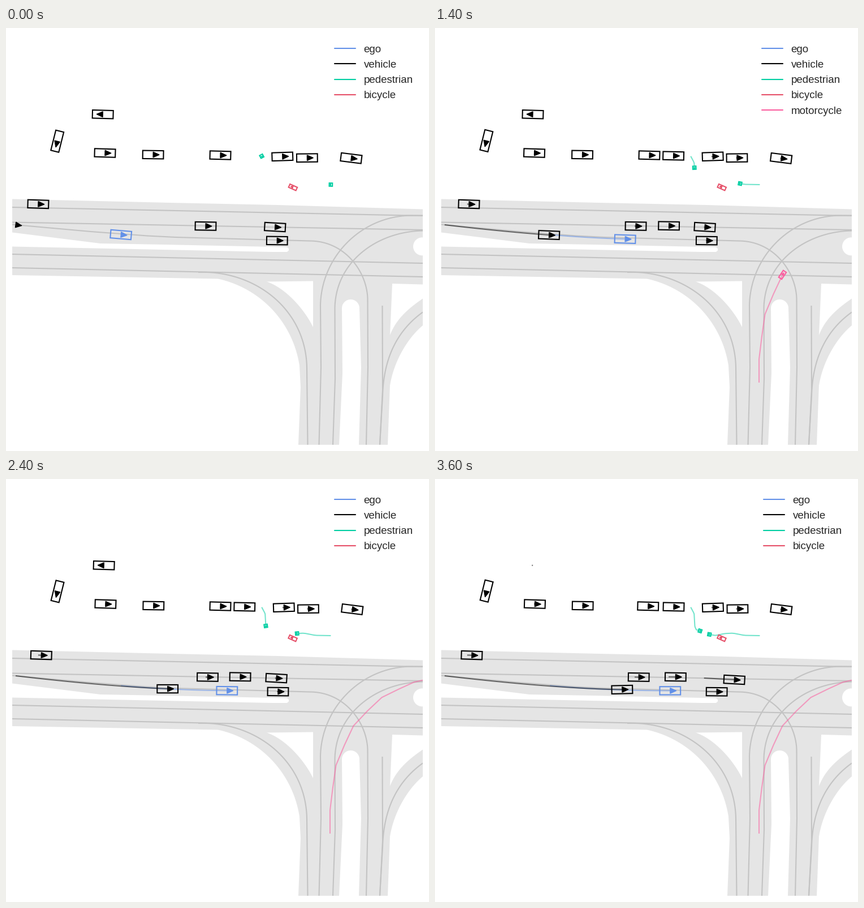
A matplotlib script that plays this animation: 748 by 748 pixels, repeating every 3.8 s.

```python
import numpy as np
import matplotlib.pyplot as plt
from matplotlib.animation import FuncAnimation
from matplotlib.patches import Circle, Polygon

SIZE, DPI = 748, 100
LEFT, RIGHT = 11, 737
STEPS, STEP_MS = 19, 200
STROKE = 1.5

ROAD, LANE, INK = "#e5e5e5", "#c3c3c3", "#262626"
CAR = (36.7, 14.4)
# kind: (colour, (length, width))
KINDS = {
    "ego": ("#6290e8", CAR),
    "vehicle": ("#000000", CAR),
    "pedestrian": ("#00cea2", (5.6, 5.6)),
    "bicycle": ("#e65069", (14.2, 6.2)),
    "motorcycle": ("#fb5d9f", (14.6, 6.4)),
}

plt.rcParams["font.family"] = "Liberation Sans"
fig = plt.figure(figsize=(SIZE / DPI, SIZE / DPI), dpi=DPI, facecolor="white")
side = (RIGHT - LEFT) / SIZE
ax = fig.add_axes([LEFT / SIZE, LEFT / SIZE, side, side])
ax.set_xlim(LEFT, RIGHT)
ax.set_ylim(RIGHT, LEFT)
ax.axis("off")


# ---- map ----

def bezier(a, b, c, d):
    t = np.linspace(0, 1, 60)[:, None]
    a, b, c, d = np.array([a, b, c, d], float)
    return (1 - t)**3 * a + 3 * t * (1 - t)**2 * b + 3 * t**2 * (1 - t) * c + t**3 * d


def area(points, color):
    ax.add_patch(Polygon(points, closed=True, fc=color, lw=0, zorder=1))


def lane(*points):
    ax.plot(*np.array(points).T, color=LANE, lw=STROKE, zorder=2,
            solid_capstyle="butt")


def draw_map():
    # Carriageways, side road and ramps
    inner = bezier((461, 448.5), (495, 460), (528, 498), (543, 529))
    outer = bezier((519, 597), (507, 520), (450, 460), (375, 443.5))
    area([(11, 302.5), (290, 309), (480, 313), (737, 320.5), (737, 453.5),
          (683, 452), (679, 543), (679, 630), (675, 737), (517, 737),
          (521, 635), *outer, (11, 437)], ROAD)
    area([*inner, (543, 447.5)], "white")
    upper = bezier((679, 543), (690, 515), (710, 497), (737, 478.5))
    lower = bezier((737, 526), (708, 550), (685, 593), (679, 632))
    area([*upper, *lower], ROAD)

    # Medians
    area([(11, 361.5), (167, 381), (280, 383), (497, 387.5), (500, 390),
          (500, 393.5), (497, 396), (470, 396), (11, 386.5)], "white")
    arc = np.linspace(np.pi, 2 * np.pi, 40)
    cap = np.column_stack([609.5 + 15.5 * np.cos(arc), 495.5 + 15.5 * np.sin(arc)])
    area([*cap, (628, 600), (624, 737), (589, 737), (595, 610)], "white")
    ax.add_patch(Circle((736, 386.3), 16, fc="white", lw=0, zorder=1))

    lane((11, 317), (700, 331.3), (737, 331.8))
    lane((11, 343.5), (737, 357))
    lane((11, 400), (737, 416))
    lane((11, 424), (737, 440))
    lane((11, 347.5), (150, 360), (250, 367.5), (300, 370),
         *bezier((537, 376.5), (600, 376.5), (639, 432), (639.5, 480)),
         (640, 600), (637, 737))
    lane(*bezier((340, 432), (440, 428), (530, 497), (532, 600)), (533.5, 737))
    lane((737, 331.6), *bezier((715, 331.6), (628, 333), (558, 404), (556, 490)),
         (557, 600), (553.5, 737))
    lane(*bezier((737, 358.5), (655, 360), (583, 414), (581.5, 495)),
         (582, 620), (578, 737))
    lane((665.5, 491), (666, 640), (661, 737))
    lane(*bezier((737, 502.5), (700, 529), (668, 573), (666, 650)), (661, 737))


# ---- motion: each returns positions and headings for every step ----

K = np.arange(STEPS)


def idle(x, y, deg, drift=0, settle=0, launch=(STEPS, 0)):
    """Creep along the heading, then accelerate evenly from the launch time."""
    t0, pull = launch
    d = drift * K + settle * (1 - np.exp(-K / 3)) + pull * np.maximum(0, K - t0)**2
    a = np.radians(deg)
    pos = np.column_stack([x + d * np.cos(a), y + d * np.sin(a)])
    return pos, np.full(STEPS, a)


def brake(start, stop, ease, bend, turn):
    """Slow down to a stop on a lane that levels out."""
    left = (1 - K / STEPS)**ease
    (x0, y0), (x1, y1) = start, stop
    pos = np.column_stack([x1 - (x1 - x0) * left, y1 - (y1 - y0) * left**bend])
    return pos, np.radians(turn[1] + (turn[0] - turn[1]) * left)


def follow(points, progress):
    """Travel a polyline; progress is the share of its length."""
    p = np.array(points, float)
    s = np.r_[0, np.cumsum(np.hypot(*np.diff(p, axis=0).T))]
    d = np.clip(progress, 0, 1) * s[-1]
    pos = np.column_stack([np.interp(d, s, p[:, 0]), np.interp(d, s, p[:, 1])])
    step = np.gradient(pos, axis=0)
    return pos, np.arctan2(step[:, 1], step[:, 0])


class Agent:
    def __init__(self, kind, motion, start=0, stop=STEPS):
        self.kind, self.start, self.stop = kind, start, stop
        self.color, (length, width) = KINDS[kind]
        self.pos, self.angle = motion
        self.a, self.b = length / 2, width / 2

    def active(self, k):
        return self.start <= k < self.stop

    def place(self, k, shape):
        c, s = np.cos(self.angle[k]), np.sin(self.angle[k])
        return np.array(shape) @ np.array([[c, s], [-s, c]]) + self.pos[k]

    def draw(self, k):
        trail = self.pos[self.start:min(k, self.stop) + 1]
        art = ax.plot(*trail.T, color=self.color, alpha=0.55, lw=STROKE, zorder=3,
                      solid_capstyle="butt")
        if not self.active(k):
            return art
        a, b = self.a, self.b
        box = self.place(k, [(-a, -b), (a, -b), (a, b), (-a, b)])
        if box[:, 0].min() > LEFT and box[:, 0].max() < RIGHT:
            art.append(ax.add_patch(Polygon(box, fill=False, ec=self.color, lw=STROKE,
                                            joinstyle="miter", zorder=4)))
        head = self.place(k, [(0, -0.68 * b), (0.6 * a, 0), (0, 0.68 * b)])
        art.append(ax.add_patch(Polygon(head, fc=self.color, ec=self.color, lw=0.9,
                                        joinstyle="miter", zorder=5)))
        return art


def car(*args, start=0, stop=STEPS, **motion):
    return Agent("vehicle", idle(*args, **motion), start, stop)


agents = [
    Agent("ego", brake((203.2, 365.5), (416.2, 374.4), 2.13, 2.05, (4.8, 0))),
    Agent("vehicle", brake((17, 348), (332, 372.4), 1.92, 1.53, (7.5, -1.3))),
    # Parked in the lot
    car(171.2, 152.7, 181.6, settle=-2, stop=14),
    car(90.7, 200.2, 104, drift=-0.12),
    car(175, 221, 1.8, drift=0.08),
    car(260.1, 224, 0.8, drift=0.06),
    car(379, 225, 1.5, launch=(14, -0.14)),
    car(421.3, 226, 1.2, drift=0.04, start=4),
    car(488.8, 227.3, -1.8, settle=2.6),
    car(532.4, 229.7, -0.6, drift=0.08, settle=1.1),
    car(610.4, 230.2, 7.2, settle=1.9),
    # Waiting in the lanes
    car(56.9, 311.4, 1.8, drift=0.45),
    car(353, 350.3, 0.9, drift=0.29, launch=(16, 0.5)),
    car(412.9, 349.8, 0.9, drift=0.1, launch=(14.5, 0.87), start=2),
    car(475.7, 352, 3.2, drift=0.2, launch=(12, 1.39)),
    car(479.3, 376, 0.6, drift=0.14, launch=(12.5, 0.54)),
    Agent("pedestrian", follow([(452.2, 226.7), (458.2, 238), (459.5, 261),
                                (462, 266.5), (468.7, 268.6)], (K / 18)**0.85)),
    Agent("pedestrian", follow([(574.4, 277), (547, 276.5), (527, 272.6),
                                (512, 273.3), (496.5, 276.8), (485.2, 274.8)], K / 18)),
    Agent("bicycle", idle(507.4, 281.7, 204, drift=0.03)),
    Agent("motorcycle",
          follow([(573, 627), (573, 580), (584, 503), (613, 438), (659, 389),
                  (718, 360), (745, 354)],
                 1 - (1 - np.clip((K - 2) / 10, 0, 1))**1.17), 2, 12),
]


def draw_legend(k):
    shown = [n for n in KINDS if any(a.kind == n and a.active(k) for a in agents)]
    x = 577 if "motorcycle" in shown else 580
    art = []
    for i, name in enumerate(shown):
        y = 36 + 27.3 * i
        art += ax.plot([x + 1, x + 38], [y, y], color=KINDS[name][0], lw=STROKE,
                       solid_capstyle="round", zorder=6)
        art.append(ax.text(x + 52.6, y + 6.6, name, fontsize=13.5, color=INK))
    return art


moving = []


def update(k):
    for art in moving:
        art.remove()
    moving.clear()
    for agent in agents:
        moving.extend(agent.draw(k))
    moving.extend(draw_legend(k))
    return moving


draw_map()
anim = FuncAnimation(fig, update, frames=STEPS, interval=STEP_MS,
                     init_func=lambda: update(0), repeat=True, repeat_delay=0)
plt.show()
```
